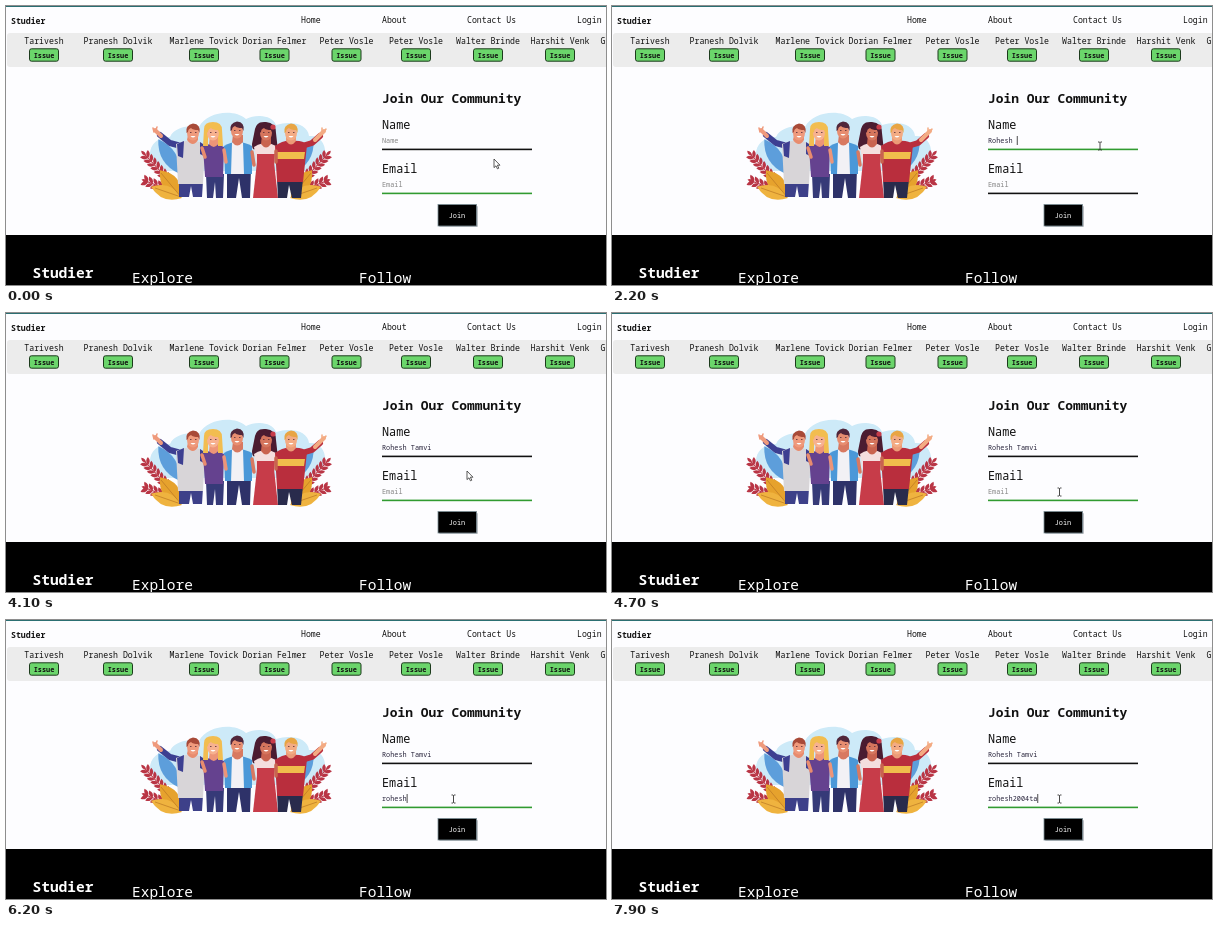
Write an HTML page that moves like this. It is 600 px wide and 279 px high and loops after 8000 ms.

```html
<!DOCTYPE html>
<html lang="en">
<head>
<meta charset="utf-8">
<title>Join form</title>
<style>
html, body { margin: 0; width: 100%; height: 100%; overflow: hidden; background: #fdfdff; }
svg { display: block; width: 100vw; height: 100vh; }
text { font-family: "Noto Sans Mono", "DejaVu Sans Mono", monospace; fill: #111; white-space: pre; }
.bold { font-weight: 700; }
.mid { text-anchor: middle; }
.nav { font-size: 8.2px; }
.person { font-size: 8.2px; font-weight: 500; }
.issue { font-size: 6.9px; font-weight: 600; }
.label { font-size: 11.8px; }
.input { font-size: 6.86px; }
.foot { font-size: 14.5px; fill: #fff; }
.limb { fill: none; stroke-linecap: round; stroke-linejoin: round; }
</style>
</head>
<body>
<svg viewBox="0 0 600 279">
  <rect width="600" height="279" fill="#fdfdff"/>
  <rect width="600" height="1" fill="#2b6f72"/>

  <text class="nav bold" x="5" y="17.5">Studier</text>
  <text class="nav" x="295" y="17">Home</text>
  <text class="nav" x="376" y="17">About</text>
  <text class="nav" x="461" y="17">Contact Us</text>
  <text class="nav" x="571" y="17">Login</text>

  <rect x="1" y="27" width="610" height="34" rx="3" fill="#ececec"/>
  <g id="people"></g>
  <text class="person" x="594.5" y="38">G</text>

  <!-- group illustration -->
  <path d="M144 151C143 139 151 131 164 131C168 121 184 119 193 121C200 106 228 102 240 113C250 108 266 109 270 119C285 114 302 118 303 130C314 129 321 138 319 152L300 165H160Z" fill="#cdeaf8"/>
  <g id="plants"></g>

  <g class="limb">
    <path d="M175 140L164 137L154 129" stroke="#3d3f91" stroke-width="6"/>
    <path d="M155 130L149 124" stroke="#ef9a7c" stroke-width="4"/>
    <path d="M148 126l-1-4M150 124l1-3" stroke="#ef9a7c" stroke-width="1.5"/>
    <path d="M296 140L306 137L314 130" stroke="#b92e3d" stroke-width="6"/>
    <path d="M309 134L318 125" stroke="#f3ab83" stroke-width="4"/>
    <path d="M318 126l2-3M316 125l0-3" stroke="#f3ab83" stroke-width="1.5"/>
  </g>

  <path d="M173 175H197L196 191H187L185 180L183 191H173Z" fill="#3d4089"/>
  <path d="M170 138Q178 134 187 135Q196 135 199 140L197 178H172Z" fill="#d8d5d8"/>
  <path d="M171 138L178 135L177 152L172 150ZM194 136L200 140L198 150L194 148Z" fill="#3d3f91"/>
  <path d="M181 134Q187 142 192 134V129H182Z" fill="#e88c6e"/>

  <path d="M200 168H218L217 192H210L209 176L207 192H201Z" fill="#363a78"/>
  <path d="M197 141Q207 134 218 141L217 171H199Z" fill="#65428f"/>
  <path d="M198 123Q198 116 207 116Q216 116 216 124L217 140H212V131H202V140H197Z" fill="#f2bd50"/>
  <path d="M203 138Q208 144 212 138V130H204Z" fill="#ed9578"/>

  <path d="M221 163H245L244 192H236L233 172L230 192H221Z" fill="#2e3269"/>
  <path d="M218 140Q231 132 246 140L246 168H219Z" fill="#4b98d8"/>
  <path d="M226 137H237L238 168H225Z" fill="#f2f1f5"/>
  <path d="M226 136Q231 143 237 136V129H227Z" fill="#d87961"/>

  <path d="M249 123Q251 115 260 116Q270 117 270 127L272 145Q268 153 264 143L252 141Q246 147 246 138Z" fill="#4b1c31"/>
  <path d="M251 156H268L272 192H247Z" fill="#c73c49"/>
  <path d="M248 141Q260 133 271 141L268 158H251Z" fill="#f4dede"/>
  <path d="M251 148H269L268 158H251Z" fill="#c73c49"/>
  <path d="M255 138Q260 145 265 138V129H256Z" fill="#c9634f"/>

  <path d="M271 173H297L295 192H286L283 179L281 192H272Z" fill="#292b4c"/>
  <path d="M269 140Q277 134 286 135Q297 134 301 139L297 176H271Z" fill="#b92e3d"/>
  <path d="M270 146H299L298 153H270Z" fill="#f0bd4c"/>
  <path d="M280 135Q285 142 290 135V129H280Z" fill="#ec9b77"/>
  <g id="heads"></g>
  <g class="limb" stroke-width="3.5">
    <path d="M196 142L199 151" stroke="#e88c6e"/>
    <path d="M218 144L220 156" stroke="#ed9578"/>
    <path d="M246 146L248 159" stroke="#d87961"/>
    <path d="M270 145L270 156" stroke="#c9634f"/>
  </g>

  <text class="bold" x="376" y="96.5" font-size="12.9">Join Our Community</text>
  <text class="label" x="376" y="123">Name</text>
  <text class="label" x="376" y="167">Email</text>
  <text class="input" id="nameText" x="376" y="137"></text>
  <text class="input" id="mailText" x="376" y="181"></text>
  <rect id="nameLine" x="376" y="142.6" width="150" height="1.6"/>
  <rect id="mailLine" x="376" y="186.6" width="150" height="1.6"/>
  <rect id="caret" y="130" width=".8" height="9" fill="#222"/>

  <rect x="433" y="200" width="39" height="21" rx="1" fill="#9a9fa5" opacity=".65"/>
  <rect x="432" y="198.5" width="38.5" height="21.5" fill="#000" stroke="#7b8d94" stroke-width=".8"/>
  <text class="mid" x="451" y="211.7" font-size="6.9" font-weight="500" style="fill:#fff">Join</text>

  <rect y="229" width="600" height="50" fill="#000"/>
  <text class="foot bold" x="26.5" y="272">Studier</text>
  <text class="foot" x="126" y="277">Explore</text>
  <text class="foot" x="353" y="277">Follow</text>

  <path id="arrow" d="M0 0V8.6L2 6.8L3.4 9.8L4.8 9.2L3.4 6.2H6Z" fill="#fff" stroke="#333" stroke-width=".8"/>
  <path id="beam" d="M-2-4H-.5L0-3.5L.5-4H2M0-3.5V3.5M-2 4H-.5L0 3.5L.5 4H2" fill="none" stroke="#333" stroke-width=".9"/>
</svg>
<script>
const el = id => document.getElementById(id);

// Name strip
const people = [
  ["Tarivesh", 38], ["Pranesh Dolvik", 112], ["Marlene Tovick", 198], ["Dorian Felmer", 268.5],
  ["Peter Vosle", 340.5], ["Peter Vosle", 410], ["Walter Brinde", 482], ["Harshit Venk", 554]
];
el("people").innerHTML = people.map(([name, x]) => `
  <text class="person mid" x="${x}" y="38">${name}</text>
  <rect x="${x - 14.5}" y="42.8" width="29" height="12.4" rx="2" fill="#6bd56b" stroke="#1c3a1c"/>
  <text class="issue mid" x="${x}" y="51.6">Issue</text>`).join("");

// Foliage
const leaf = (x, y, angle, length, width, color) =>
  `<path transform="translate(${x} ${y}) rotate(${angle})" fill="${color}"
    d="M0 0Q${length / 2} ${-width} ${length} 0Q${length / 2} ${width} 0 0"/>`;

function sprig(x, y, angle, length, color) {
  let out = `<path d="M0 0H${length}" stroke="${color}"/>`;
  for (let d = 6; d < length; d += 5)
    out += leaf(d, 0, -42, 8, 3.6, color) + leaf(d, 0, 42, 8, 3.6, color);
  out += leaf(length - 2, 0, 0, 7, 3, color);
  return `<g transform="translate(${x} ${y}) rotate(${angle})">${out}</g>`;
}

const plant =
  leaf(174, 168, -122, 41, 14, "#5d9edb") +
  sprig(170, 182, -133, 46, "#b93545") +
  sprig(171, 187, -159, 33, "#b93545") +
  leaf(175, 191, -128, 34, 16, "#e6a22d") +
  leaf(176, 192, -160, 33, 13, "#efb33f") +
  `<path d="M175 191L155 167M175 191L149 182" stroke="#b97824" stroke-width=".7"/>`;
el("plants").innerHTML = plant + `<g transform="translate(460) scale(-1 1)">${plant}</g>`;

// Faces and hair
const heads = [
  [187, 127, "#ef9a7c", "#a84a38"], [207, 127, "#f7b18f", "#f2bd50"],
  [231, 125, "#e78d70", "#51263a"], [260, 127, "#d5755d", "#4b1c31"],
  [285, 127, "#f3ab83", "#e8a544"]
];
el("heads").innerHTML = heads.map(([x, y, skin, hair]) => `
  <g transform="translate(${x} ${y})">
    <ellipse rx="6" ry="7.5" fill="${skin}"/>
    <path d="M-6.5 0Q-8-8 0-9.5Q8-9 6.5 0L5-3Q0-3-2-5Q-5-4-5-1Z" fill="${hair}"/>
    <path d="M-3-.5h1.5M2-.5h1.5" stroke="#512b37" stroke-width=".8"/>
    <path d="M-2.5 3Q0 6 2.5 3Z" fill="#fff"/>
  </g>`).join("") + `<circle cx="267" cy="121" r="2.6" fill="#c73c49"/>`;

// Timeline, in ms
const LOOP = 8000, CHAR = 4.116;
const fields = [
  { text: "Rohesh Tamvi", y: 130, hint: "Name", label: "name", from: 700, to: 3600,
    keys: [1200, 1330, 1460, 1590, 1720, 1860, 2000, 2300, 2500, 2700, 2900, 3200] },
  { text: "rohesh2004ta", y: 174, hint: "Email", label: "mail", from: 4800, to: LOOP,
    keys: [5200, 5480, 5620, 5760, 5900, 6050, 6800, 7000, 7200, 7400, 7650, 7850] }
];
const pointer = [
  [0, 488, 153], [100, 488, 153], [600, 488, 140], [3300, 488, 140],
  [3900, 461, 158], [4100, 461, 158], [4700, 447.5, 179], [LOOP, 447.5, 179]
];

function pointerAt(t) {
  const i = pointer.findIndex(p => p[0] > t);
  const [t0, x0, y0] = pointer[i - 1], [t1, x1, y1] = pointer[i];
  const u = (t - t0) / (t1 - t0), k = u * u * (3 - 2 * u);
  return [x0 + (x1 - x0) * k, y0 + (y1 - y0) * k];
}

function draw(t) {
  const onName = t >= 400 && t < 3600;
  el("caret").style.display = "none";
  for (const f of fields) {
    const count = f.keys.filter(k => k <= t).length;
    const text = el(f.label + "Text");
    text.textContent = count ? f.text.slice(0, count) : f.hint;
    text.style.fill = count ? "#29253c" : "#858585";
    el(f.label + "Line").style.fill = (f.label === "name") === onName ? "#319b31" : "#111";

    const since = t - (count ? f.keys[count - 1] : f.from);
    if (t >= f.from && t < f.to && since % 1060 < 530) {
      el("caret").style.display = "";
      el("caret").setAttribute("x", 376 + CHAR * count);
      el("caret").setAttribute("y", f.y);
    }
  }

  const [x, y] = pointerAt(t);
  const typing = y < 145 || y > 172;
  el("arrow").style.display = typing ? "none" : "";
  el("beam").style.display = typing ? "" : "none";
  el(typing ? "beam" : "arrow").setAttribute("transform", `translate(${x} ${y})`);
}

const start = performance.now();
function tick() {
  draw((performance.now() - start) % LOOP);
  requestAnimationFrame(tick);
}
tick();
</script>
</body>
</html>
```
